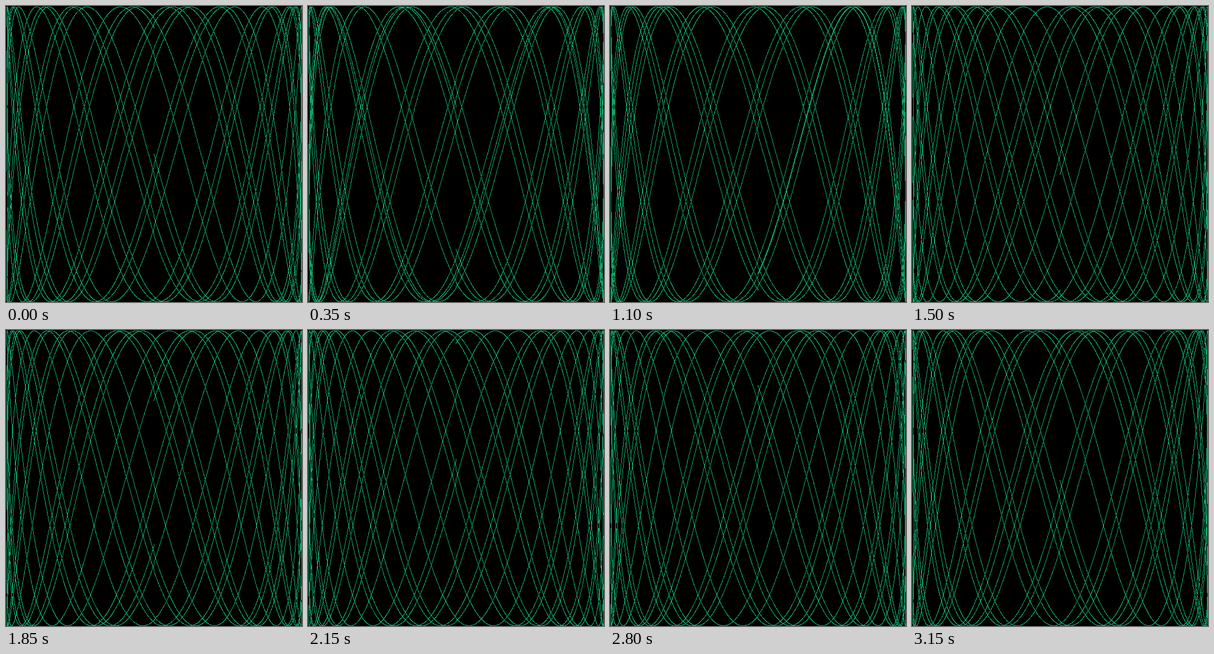
An HTML page with a canvas that plays this animation: 501x501 px, repeating every 3200 ms.

```html
<!DOCTYPE html>
<html lang="en">
<head>
<meta charset="utf-8">
<title>Lissajous</title>
<style>
  html, body { margin: 0; width: 100%; height: 100%; overflow: hidden; background: #000; }
  canvas { display: block; width: 501px; height: 501px; image-rendering: pixelated; }
</style>
</head>
<body>
<canvas id="stage" width="501" height="501"></canvas>
<script>
const RADIUS = 250;
const SIDE = 2 * RADIUS + 1;
const CYCLES = 8;
const STEP = 0.001;
const FREQUENCY = 3.6046602879796196;
const POSES = 64;
const POSE_MS = 50;
const PHASE_STEP = 0.1;

// Pixels are packed as ABGR.
const BLACK = 0xff000000;
const GREEN = 0xff66a210;

const context = document.getElementById("stage").getContext("2d");
const image = context.createImageData(SIDE, SIDE);
const pixels = new Uint32Array(image.data.buffer);

// Rounding toward zero after the half-pixel shift widens the centre row and column.
const toPixel = v => RADIUS + Math.trunc(v * RADIUS + 0.5);

function draw(pose) {
  const phase = pose * PHASE_STEP;
  pixels.fill(BLACK);
  for (let t = 0; t < CYCLES * 2 * Math.PI; t += STEP) {
    const x = toPixel(Math.sin(t));
    const y = toPixel(Math.sin(t * FREQUENCY + phase));
    pixels[y * SIDE + x] = GREEN;
  }
  context.putImageData(image, 0, 0);
}

const start = performance.now();
let shown = 0;

function tick() {
  const elapsed = Math.max(0, performance.now() - start);
  const pose = Math.floor(elapsed / POSE_MS) % POSES;
  if (pose !== shown) {
    shown = pose;
    draw(pose);
  }
  requestAnimationFrame(tick);
}

draw(0);
requestAnimationFrame(tick);
</script>
</body>
</html>
```
